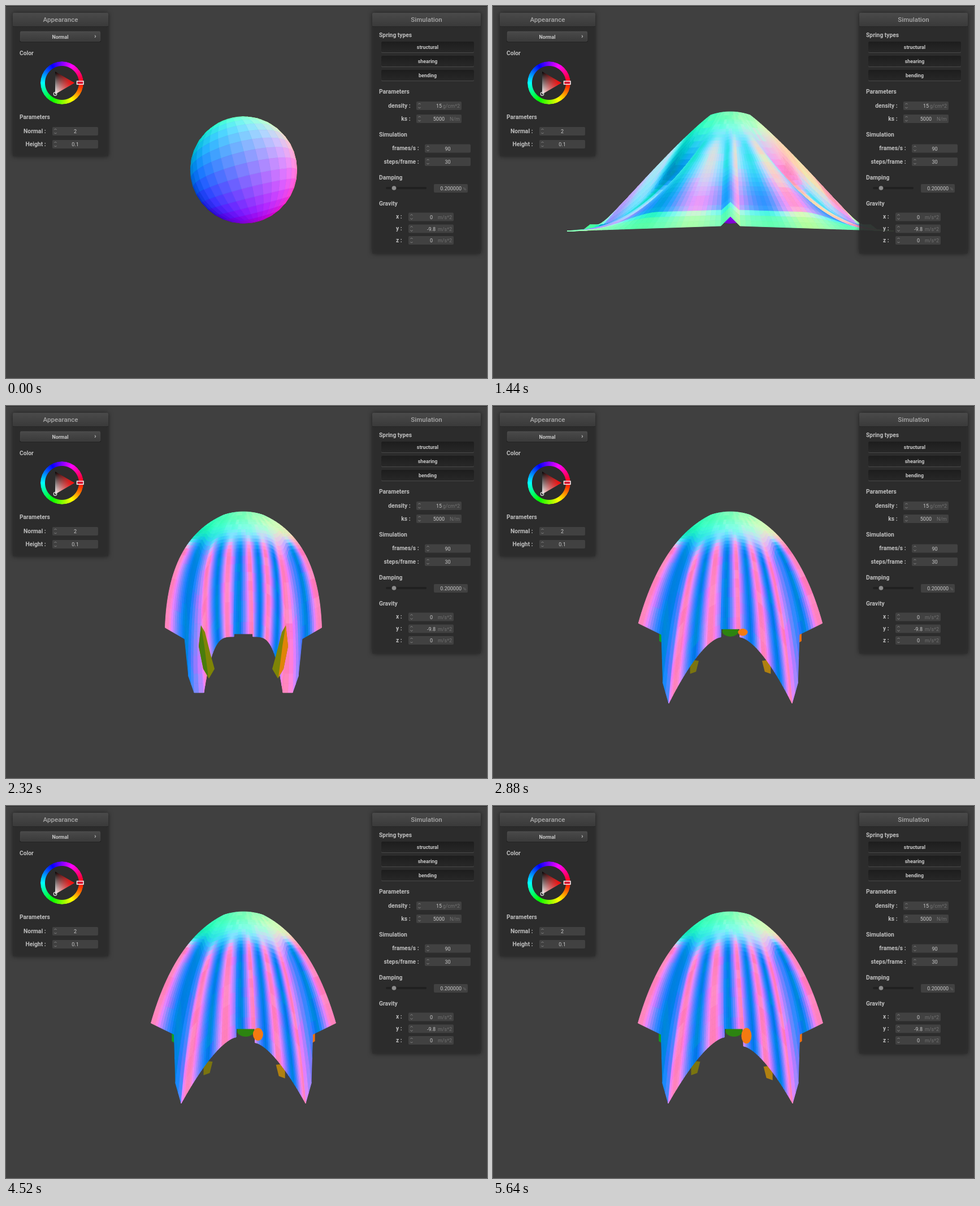
These frames come from a looping animation (851x658 px, 5680 ms). An HTML page with a canvas:

```html
<!DOCTYPE html>
<html lang="en">
<head>
<meta charset="utf-8">
<title>Cloth simulation</title>
<style>
html, body { margin: 0; width: 100%; height: 100%; overflow: hidden; background: #404040; }
canvas, svg, #wheel { position: absolute; left: 0; top: 0; }
text { font-family: Roboto, "Open Sans", sans-serif; }
#wheel {
  left: 61px; top: 98px; width: 76px; height: 76px; border-radius: 50%;
  background: conic-gradient(from 90deg, red, yellow, lime, cyan, blue, magenta, red);
  -webkit-mask: radial-gradient(circle, transparent 29.5px, #000 30.5px);
  mask: radial-gradient(circle, transparent 29.5px, #000 30.5px);
}
</style>
</head>
<body>
<canvas id="stage" width="851" height="658"></canvas>
<svg id="ui" width="851" height="658"></svg>
<div id="wheel"></div>
<script>
// ---------- panels ----------
const label = (x, y, s, size = 10.3, fill = '#bebebe', anchor = 'start', weight = 700) =>
  `<text x="${x}" y="${y + size * .36}" font-size="${size}" fill="${fill}" text-anchor="${anchor}" font-weight="${weight}">${s}</text>`;
const box = (x, y, w, h, fill, extra = '') =>
  `<rect x="${x}" y="${y}" width="${w}" height="${h}" rx="2" fill="${fill}" ${extra}/>`;
const panel = (x, w, h, title) =>
  box(x, 12, w, h, 'rgba(46,46,46,.88)', 'style="filter:drop-shadow(0 0 4px rgba(0,0,0,.6))"') +
  box(x, 12, w, 24, 'url(#head)') + `<path d="M${x} 36.5h${w}" stroke="#252525"/>` +
  label(x + w / 2, 24, title, 11.6, '#a8a8a8', 'middle', 500);
const arrows = (x, y) =>
  `<path d="M${x - 2} ${y - 2.5}l2 -2 2 2M${x - 2} ${y + 2.5}l2 2 2 -2" fill="none" stroke="#888"/>`;
// numeric field: the value is centred, or ends at vx when a unit follows
const field = (name, nx, x, y, w, value, unit, vx, ux) =>
  label(nx + .6, y - .6, name + ' :', 10.3, '#bebebe', 'end') +
  box(x, y - 7.5, w, 15, '#414141') + arrows(x + 5.5, y) +
  label(unit ? vx : x + w / 2, y + .5, value, 9, '#c8c8c8', unit ? 'end' : 'middle', 400) +
  (unit ? label(ux, y + .5, unit, 9, '#707070', 'end', 400) : '');
const toggle = (y, s) =>
  box(664, y - 9, 164, 19, '#484848') + box(664, y - 10, 164, 19, 'url(#dark)') +
  label(746, y, s, 8.8, '#c8c8c8', 'middle');

document.getElementById('ui').innerHTML = `<defs>
  <linearGradient id="head" x2="0" y2="1"><stop stop-color="#4a4a4a"/><stop offset="1" stop-color="#3a3a3a"/></linearGradient>
  <linearGradient id="dark" x2="0" y2="1"><stop stop-color="#1d1d1d"/><stop offset="1" stop-color="#282828"/></linearGradient>
  <linearGradient id="grey" x2="0" y2="1"><stop stop-color="#000"/><stop offset="1" stop-color="#fff"/></linearGradient>
  <linearGradient id="hue"><stop stop-color="red" stop-opacity="0"/><stop offset="1" stop-color="red"/></linearGradient>
</defs>` +
  panel(12, 169, 254, 'Appearance') +
  box(24, 45, 144, 19, '#222') + box(25, 45, 142, 17.5, 'url(#head)', 'stroke="#555" stroke-width=".5"') +
  label(96, 54.5, 'Normal', 8.8, '#c8c8c8', 'middle') + label(158, 53, '›', 11, '#c8c8c8', 'middle') +
  label(24, 83, 'Color') +
  '<path d="M87 116L121 136L87 156Z" fill="url(#grey)"/><path d="M87 116L121 136L87 156Z" fill="url(#hue)"/>' +
  '<circle cx="87" cy="155.5" r="2.8" fill="none" stroke="#ddd" stroke-width="1.2"/>' +
  label(24, 196, 'Parameters') +
  field('Normal', 70, 82, 221.5, 81, '2') + field('Height', 70, 82, 244.5, 81, '0.1') +
  panel(648, 192, 426, 'Simulation') +
  label(660, 51, 'Spring types') + toggle(73, 'structural') + toggle(98, 'shearing') + toggle(123, 'bending') +
  label(660, 151, 'Parameters') +
  field('density', 715, 726, 176.5, 80, '15', 'g/cm^2', 771, 803) +
  field('ks', 715, 726, 199.5, 80, '5000', 'N/m', 776, 803) +
  label(660, 227, 'Simulation') +
  field('frames/s', 730, 741, 252, 81, '90') + field('steps/frame', 730, 741, 275.5, 81, '30') +
  label(660, 303, 'Damping') +
  box(672, 320, 72, 4, '#202020') +
  '<circle cx="686.5" cy="322" r="5.2" fill="#2a2a2a"/><circle cx="686.5" cy="322" r="3.8" fill="#8c8c8c"/>' +
  box(757, 315, 60, 15, '#414141') + label(806, 323, '0.200000', 9, '#c8c8c8', 'end', 400) +
  label(814, 323, '%', 8, '#707070', 'end', 400) +
  label(660, 349, 'Gravity') +
  field('x', 700, 712, 373, 80, '0', 'm/s^2', 755, 789) +
  field('y', 700, 712, 394, 80, '-9.8', 'm/s^2', 760, 789) +
  field('z', 700, 712, 414.5, 80, '0', 'm/s^2', 755, 789);
document.body.insertAdjacentHTML('beforeend',
  '<svg width="851" height="658"><rect x="125.5" y="133" width="11.5" height="5.5" fill="#d01030" stroke="#fff" stroke-width="1.4"/></svg>');

// ---------- drawing helpers ----------
const ctx = document.getElementById('stage').getContext('2d');
const { hypot, sqrt, sin, cos, exp, max, min, abs, floor, PI } = Math;
const lerp = (a, b, f) => a + (b - a) * f;
const smooth = (a, b, v) => { v = min(1, max(0, (v - a) / (b - a))); return v * v * (3 - 2 * v); };
const jitter = (i, j) => { const s = sin(i * 12.99 + j * 78.23) * 43758.5; return s - floor(s) - .5; };
const shade = (...n) => { // normal to colour, with raised contrast
  const gain = 127.5 * 1.28 / hypot(...n);
  return `rgb(${n.map(v => Math.round(min(255, max(0, 127.5 + gain * v))))})`;
};
function poly(points, color, edge) {
  ctx.beginPath();
  for (const p of points) ctx.lineTo(p[0], p[1]);
  ctx.closePath();
  ctx.fillStyle = ctx.strokeStyle = color;
  ctx.fill();
  if (edge) { ctx.lineWidth = edge; ctx.stroke(); }
}
function oval(x, y, rx, ry, color) {
  ctx.beginPath();
  ctx.ellipse(x, y, max(0, rx), max(0, ry), 0, 0, 2 * PI);
  ctx.fillStyle = color;
  ctx.fill();
}

// ---------- perspective: sphere and falling sheet ----------
const FOCAL = 245, DIST = .835, CX = 420.5, CY = 290;
const project = (x, y, z) => {
  const s = FOCAL / (DIST - z);
  return [CX + x * s, CY - y * s];
};
const onSphere = (lat, lon) => {
  const x = cos(lat) * sin(lon), y = sin(lat), z = cos(lat) * cos(lon);
  const x1 = x * .97 - y * .24, y1 = x * .24 + y * .97;
  return [x1, y1 * .97 + z * .24, z * .97 - y1 * .24];
};
const cells = [];
for (let i = 0; i < 20; i++) for (let j = 0; j < 40; j++) {
  const d = PI / 20, a = i * d - PI / 2, b = j * d;
  const n = onSphere(a + d / 2, b + d / 2);
  if (n[2] < .1) continue;
  const quad = [[a, b], [a + d, b], [a + d, b + d], [a, b + d]]
    .map(q => project(...onSphere(...q).map(v => v * .3)));
  cells.push({ z: n[2], quad, color: shade(n[0], n[1], max(.3, n[2])) });
}
cells.sort((a, b) => a.z - b.z);
const drawSphere = () => cells.forEach(c => poly(c.quad, c.color, .8));

function drawFall(t) {
  const n = max(0, (t - 240) / 40), level = .5 - .000728 * n * n;
  const c = 1 - .1 * max(0, (t - 1100) / 340) ** 4, N = 48, R = .325, R0 = .261;
  const height = (x, z) => { // dome, then a folded cone, caught above the falling level
    const r = hypot(x, z);
    const drape = r < R0 ? sqrt(R * R - r * r)
      : .193 - (r - R0) * (1.35 + .16 * cos(8 * Math.atan2(x, z)));
    return max(level, drape);
  };
  const point = (i, j) => {
    const x = (i / N - .5) * c, z = (j / N - .5) * c;
    return [x, height(x, z), z];
  };
  for (let j = 0; j < N; j++) {
    if (j === N / 2) drawSphere();
    for (let i = 0; i < N; i++) {
      const a = point(i, j), b = point(i + 1, j), d = point(i, j + 1), e = point(i + 1, j + 1);
      const step = c / N;
      poly([a, b, e, d].map(p => project(...p)),
        shade((a[1] - b[1]) / step, 1, (a[1] - d[1]) / step), 1);
    }
  }
}

// ---------- hanging cloth ----------
// The sheet collapses from a tent, swings inward twice and then slowly drifts.
function poseAt(t) {
  const pulse = at => exp(-(((t - at) / 300) ** 2));
  const spread = max(0, 1 - (t - 1440) / 380) ** 1.2;
  const tucked = pulse(2320) + .2 * pulse(3700);
  return {
    spread, tucked,
    loose: (1 - spread) * max(0, 1 - 1.3 * tucked),
    drift: 16 * smooth(3000, 5640, t),
    wingX: 163.5 + 61.5 * spread - 25 * tucked,
    wingY: 384 + 3 * spread + 8 * tucked,
    footX: 110 + 179 * spread - 40 * tucked,
    footY: 526 - 128 * spread - 19 * tucked,
    midY: 394 - 5 * spread + 9 * tucked,
    bend: 1.5 - .5 * spread + 2 * tucked
  };
}
// point on the lower edge: k runs from -1 (left wing) over 0 (middle fold) to 1 (right wing)
function hem(p, k) {
  const side = k < 0 ? -1 : 1, a = abs(k);
  const tubeX = 17 + side * p.drift * .4;
  const curlY = p.midY + 15 * p.loose + 5 * p.tucked + (side > 0 ? p.drift : 0);
  const footEnd = p.footX + 17 * p.tucked;
  const knots = [
    [0, side * p.drift * .4, p.midY - 17 * p.spread],
    [.1, tubeX, p.midY],
    [.14, tubeX, curlY],
    [.68, p.footX, p.footY],
    [.72, footEnd, p.footY],
    [.76, footEnd + 10 - 40 * p.spread, lerp(p.footY, p.wingY, .25)],
    [.8, .75 * p.wingX + 80 * p.spread, p.wingY + 20 * (1 - p.spread)],
    [1, p.wingX, p.wingY]
  ];
  const i = max(1, knots.findIndex(n => n[0] >= a - 1e-6));
  const [a0, x0, y0] = knots[i - 1], [a1, x1, y1] = knots[i];
  const f = (a - a0) / (a1 - a0);
  return [420 + side * lerp(x0, x1, f), lerp(y0, y1, i === 3 ? f ** p.bend : f)];
}
// sideways lean of the surface: regular folds, each rising faster than it falls
function lean(k) {
  const s = (k + .04) / (k < -.04 ? .37 : .295);
  return .08 - .9 * cos(2 * PI * (s - floor(s)) ** .85);
}

const COLS = 100, ROWS = 32;
function drawCloth(t) {
  const p = poseAt(t);
  const patch = (k, shape, side, size, color) => {
    const [x, y] = hem(p, k);
    poly(shape.map(q => [x + side * q[0] * size, y + q[1] * size]), color);
  };

  // undersides showing below the hem
  const sliver = [[-4, -4], [4, -2], [4, 17], [-4, 12]], curl = [[0, -12], [16, -10], [11, 10], [0, 14]];
  patch(-.8, sliver, 1, p.loose, '#10a020');
  patch(.8, sliver, -1, p.loose, '#f07010');
  patch(-.46, curl, 1, p.loose, '#7a7410');
  patch(.46, curl, -1, p.loose, '#b08010');
  oval(420 + p.drift * .4, p.midY + 4, 15 * p.loose, 10 * p.loose, '#2c8410');

  const grid = [];
  for (let i = 0; i <= COLS; i++) {
    const k = i / COLS * 2 - 1, a = abs(k), [hx, hy] = hem(p, k);
    const flat = p.spread * smooth(.4, .66, a) * (1 - smooth(.88, 1, a));
    const ax = 420 + 35 * k, ay = 187 + 6 * k * k;
    const bx = 420 + k * (120 + .5 * (165 - p.wingX) + 110 * flat), by = 235 + 165 * flat;
    grid.push(Array.from({ length: ROWS + 1 }, (_, j) => {
      const v = j / ROWS, u = 1 - v;
      return [u * u * ax + 2 * u * v * bx + v * v * hx, u * u * ay + 2 * u * v * by + v * v * hy];
    }));
  }
  for (let o = 0; o < COLS; o++) {
    const i = o % 2 ? COLS - 1 - (o >> 1) : o >> 1; // outside in
    const k = (i + .5) / COLS * 2 - 1;
    for (let j = 0; j < ROWS; j++) {
      const a = grid[i][j], b = grid[i + 1][j], c = grid[i + 1][j + 1], d = grid[i][j + 1];
      const v = (j + .5) / ROWS, w = smooth(.25, .5, v);
      const dx = (a[0] + c[0] - 840) / 220, dy = (600 - a[1] - c[1]) / 220;
      const dz = sqrt(max(.15, 1 - dx * dx - dy * dy));
      const rough = .2 * jitter(i >> 2, j >> 1);
      const nx = lean(k) * (1 - .25 * p.spread) + .3 * k * p.spread;
      const ny = .02 + p.spread * (.75 - .6 * smooth(.55, .85, v) + 2.4 * smooth(.88, .98, v));
      const nz = sqrt(max(.15, 1 - nx * nx));
      poly([a, b, c, d], shade(lerp(dx, nx, w) + rough, lerp(dy, ny, w) - rough * .6, lerp(dz, nz, w)), .9);
    }
  }

  // curled edge beside the middle fold, then the insides of the tucked corners
  const [rx, ry] = hem(p, .1), drop = hem(p, .14)[1] - ry;
  oval(rx + 5, ry + drop * .4, 9 * p.loose, drop * .45 * p.loose, '#f47a10');
  const size = smooth(.3, 1, p.tucked);
  if (size > 0) for (const [side, edge] of [[-1, '#4a7c0c'], [1, '#e08408']]) {
    const flap = (shape, color) =>
      poly(shape.map(([x, y]) => [420 + side * lerp(60, x, size), lerp(470, y, size)]), color);
    flap([[75, 388], [68, 400], [58, 440], [51, 465], [61, 482], [71, 465], [79, 425]], '#7e8406');
    flap([[75, 388], [69, 425], [62, 480], [71, 465], [79, 425]], edge);
  }
}

// ---------- loop ----------
function draw(t) {
  ctx.fillStyle = '#404040';
  ctx.fillRect(0, 0, 851, 658);
  ctx.fillStyle = '#2a2a2a';
  ctx.fillRect(0, 0, 851, 1);
  if (t >= 200 && t < 1440) drawFall(t);
  else {
    drawSphere();
    if (t >= 1440) drawCloth(t);
  }
}
let shown = -1;
function tick() {
  const t = floor(performance.now() % 5680 / 40) * 40;
  if (t !== shown) draw(shown = t);
  requestAnimationFrame(tick);
}
tick();
</script>
</body>
</html>
```
